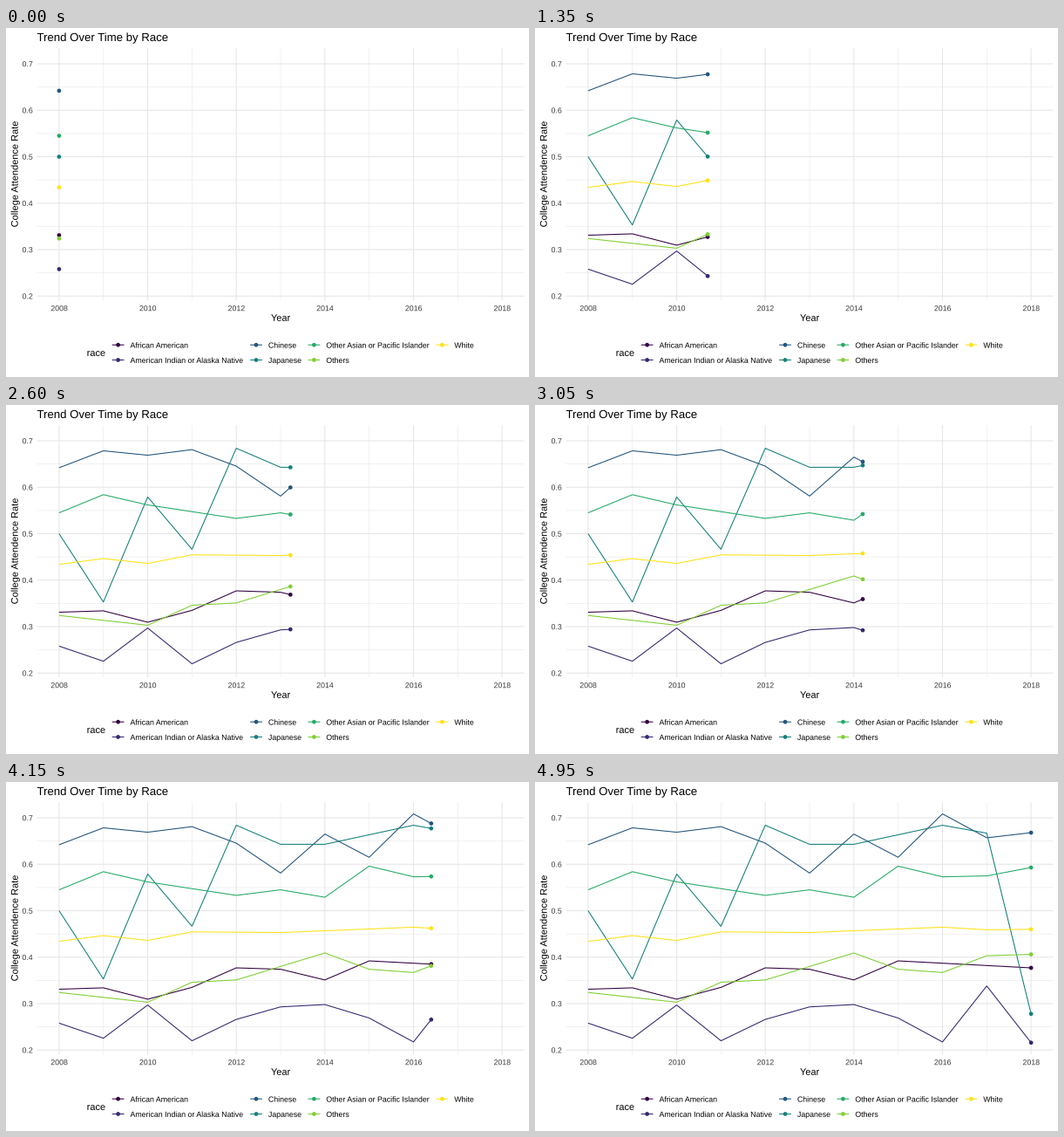
These frames come from a looping animation (600x400 px, 5000 ms). A matplotlib script:

```python
import numpy as np
import matplotlib.pyplot as plt
from matplotlib.animation import FuncAnimation
from matplotlib.patches import PathPatch
from matplotlib.textpath import TextPath
from matplotlib.transforms import Affine2D

W, H, DPI = 600, 400, 100
PT = 72 / DPI                       # points per pixel
LEFT, RIGHT, TOP, BOTTOM = 35.5, 594.5, 23.3, 312.2
FRAMES, INTERVAL = 100, 50
GAMMA = 1.22                        # darkens every tone a little

plt.rcParams["font.family"] = "Liberation Sans"

# Rates for 2008-2018; "_" lies on the straight line between its neighbours.
_ = np.nan
RATES = {
    "African American":
        [.331, .334, .3095, .335, .377, .374, .351, .392, _, _, .377],
    "American Indian or Alaska Native":
        [.258, .2255, .297, .220, .266, .293, .298, .269, .2175, .338, .216],
    "Chinese":
        [.642, .6785, .669, .681, .6455, .581, .665, .615, .7085, .657, .668],
    "Japanese":
        [.500, .353, .579, .4665, .684, .643, .643, _, .684, .667, .278],
    "Other Asian or Pacific Islander":
        [.545, .584, .562, _, .533, .545, .529, .596, .573, .575, .593],
    "Others":
        [.324, _, .303, .346, .351, _, .409, .374, .367, .403, .406],
    "White":
        [.434, .4465, .436, .4545, _, .453, _, _, .4645, .459, .460],
}
COLORS = plt.colormaps["viridis"](np.linspace(0, 1, len(RATES)))[:, :3] ** GAMMA
YEARS = np.arange(11)
# each year takes a whole number of frames
YEAR_FRAMES = np.round((FRAMES - 1) / 10 * YEARS)

# the legend fills two rows, column by column
KEY_COLUMNS = [128.6, 287.0, 353.4, 500.4]
KEYS = np.array([(KEY_COLUMNS[i // 2], 363.2 + 17.28 * (i % 2))
                 for i in range(len(RATES))])


def gray(level):
    return (level ** GAMMA,) * 3


def px(year):
    return 60.9 + 50.82 * np.asarray(year)


def py(rate):
    return 41.05 + 532.4 * (0.7 - np.asarray(rate))


def rates_at(rates, years):
    rates = np.array(rates)
    known = ~np.isnan(rates)
    return np.interp(years, YEARS[known], rates[known])


fig = plt.figure(figsize=(W / DPI, H / DPI), dpi=DPI, facecolor="white")
ax = fig.add_axes([0, 0, 1, 1])
ax.set_xlim(0, W)
ax.set_ylim(H, 0)
ax.axis("off")


def line(x, y, color, width=1.07, z=2):
    return ax.plot(x, y, color=color, lw=width * PT, zorder=z, snap=False,
                   solid_capstyle="butt", solid_joinstyle="round")[0]


def dots(points):
    return ax.scatter(points[:, 0], points[:, 1], s=(4.7 * PT) ** 2,
                      c=COLORS, linewidths=0, zorder=3)


def text(x, y, s, size, color="black", align=0, angle=0):
    """Outlined text; align is 0 for left, 0.5 for centre, 1 for right."""
    path = TextPath((0, 0), s, size=size)
    shift = align * path.get_extents().x1
    place = (Affine2D().translate(-shift, 0).scale(1, -1)
             .rotate_deg(-angle).translate(x, y))
    ax.add_patch(PathPatch(place.transform_path(path), facecolor=color,
                           linewidth=0, snap=False, zorder=4))


def draw_grid():
    color = gray(0.92)
    for k in YEARS:
        width = 0.53 if k % 2 else 1.07
        line([px(k)] * 2, [TOP, BOTTOM], color, width, 1)
        line([LEFT, RIGHT], [py(0.2 + 0.05 * k)] * 2, color, width, 1)


def draw_labels():
    color = gray(0.3)
    for year in YEARS[::2]:
        text(px(year), 324.2, str(2008 + year), 8.8, color, align=0.5)
    for k in range(2, 8):
        text(30.4, py(k / 10) + 3.2, f"{k / 10:.1f}", 8.8, color, align=1)
    text(LEFT, 15, "Trend Over Time by Race", 13.2)
    text((LEFT + RIGHT) / 2, 335.8, "Year", 11, align=0.5)
    text(13.6, (TOP + BOTTOM) / 2, "College Attendence Rate", 11,
         align=0.5, angle=90)


def draw_legend():
    text(92.7, 376, "race", 11)
    for label, color, (x, y) in zip(RATES, COLORS, KEYS):
        line([x - 6.9, x + 6.9], [y, y], color)
        text(x + 13.9, y + 3.4, label, 8.8)
    dots(KEYS)


draw_grid()
draw_labels()
draw_legend()
curves = [line([], [], c) for c in COLORS]
heads = dots(KEYS)


def update(i):
    now = np.interp(i, YEAR_FRAMES, YEARS)
    seen = np.append(YEARS[YEARS < now], now)
    ends = []
    for curve, rates in zip(curves, RATES.values()):
        y = py(rates_at(rates, seen))
        curve.set_data(px(seen), y)
        ends.append((px(now), y[-1]))
    heads.set_offsets(ends)
    return [*curves, heads]


anim = FuncAnimation(fig, update, frames=FRAMES, interval=INTERVAL,
                     repeat=True, repeat_delay=0)
plt.show()
```
